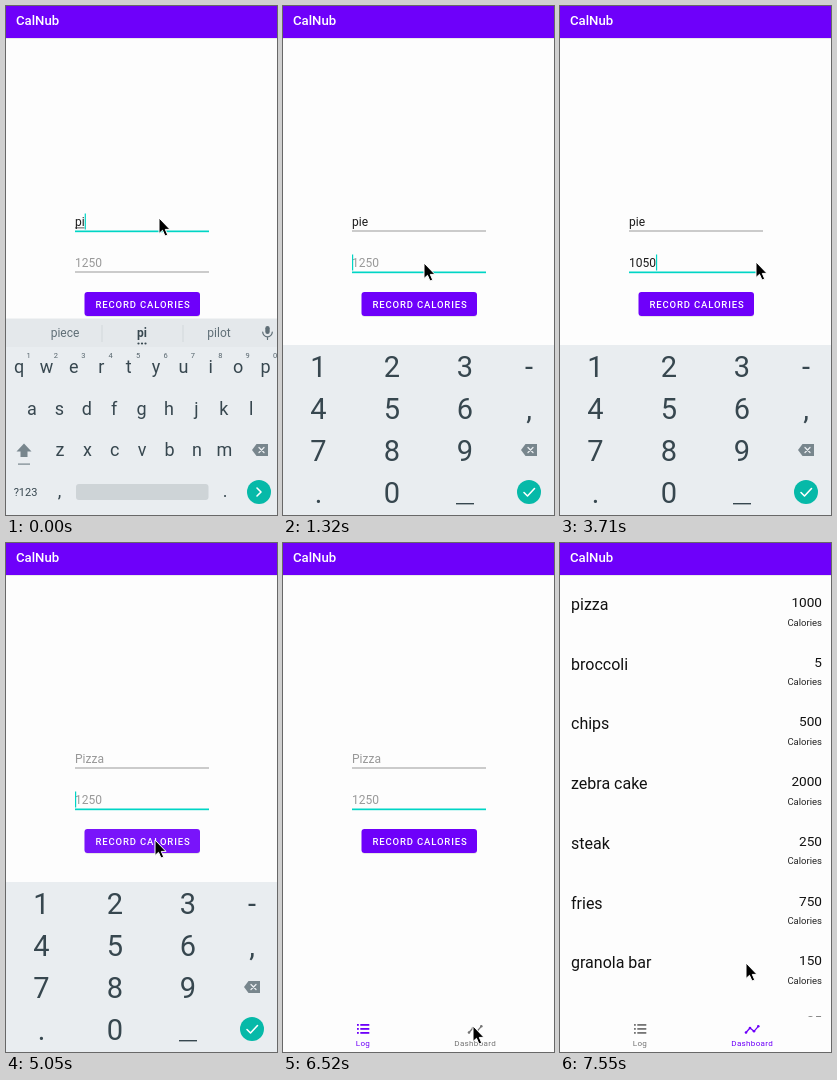
An HTML page that plays this animation: 271 px wide and 509 px high, repeating every 8000 ms.

```html
<!DOCTYPE html>
<html lang="en">
<head>
<meta charset="utf-8">
<title>Calorie log</title>
<style>
html, body { margin: 0; width: 100%; height: 100%; overflow: hidden; background: #fdfdfd; }
svg { display: block; width: 100vw; height: 100vh; font-family: Roboto, sans-serif; }
.mid { text-anchor: middle; }
.end { text-anchor: end; }
.key { fill: #37474f; font-size: 18px; }
.num { fill: #37474f; font-size: 29px; }
.line { fill: none; stroke-linecap: round; stroke-linejoin: round; }
</style>
</head>
<body>
<svg id="stage" viewBox="0 0 271 509"></svg>
<script>
const LOOP = 8000, STEPS = 54;
const PURPLE = '#6e00fa', TEAL = '#00d5c5', PANEL = '#e9edf0', INK = '#37474f', PAPER = '#fdfdfd';
const stage = document.getElementById('stage');

function add(parent, tag, attrs, text) {
  const el = document.createElementNS('http://www.w3.org/2000/svg', tag);
  for (const k in attrs) el.setAttribute(k, attrs[k]);
  if (text !== undefined) el.textContent = text;
  parent.appendChild(el);
  return el;
}
const group = (parent = stage) => add(parent, 'g', {});
const rect = (p, x, y, width, height, fill, rx = 0) => add(p, 'rect', { x, y, width, height, fill, rx });
const label = (p, x, y, text, attrs = {}) => add(p, 'text', { x, y, ...attrs }, text);
const stroke = (p, d, color, width) =>
  add(p, 'path', { d, stroke: color, 'stroke-width': width, class: 'line' });
const show = (el, on) => el.setAttribute('display', on ? 'inline' : 'none');
const set = (el, attrs) => { for (const k in attrs) el.setAttribute(k, attrs[k]); };

function backspace(p, x, y) {
  add(p, 'path', { d: `M${x - 8} ${y}l4.5 -6h11.500v12h-11.500z`, fill: '#78868d' });
  stroke(p, `M${x - 1} ${y - 2.5}l5 5m0 -5l-5 5`, PANEL, 1.3);
}
function action(p, x, y, d) {
  add(p, 'circle', { cx: x, cy: y, r: 12, fill: '#06b9a8' });
  stroke(p, d, '#fff', 1.6);
}

// page with the form
rect(stage, 0, 0, 271, 509, PAPER);
const veil = rect(stage, 0, 286, 271, 223, '#fafafb');
const form = group();

function field(base, hint) {
  const text = label(form, 69, base, hint, { 'font-size': 12 });
  const line = rect(form, 69, base + 4.5, 134, 1, '#999');
  const caret = rect(form, 69, base - 12.5, 1.2, 16, TEAL);
  return (value, focus, blink, width) => {
    text.textContent = value || hint;
    text.setAttribute('fill', value ? '#1c1c1c' : '#999');
    set(line, { fill: focus ? TEAL : '#999', height: focus ? 1.7 : 1 });
    caret.setAttribute('x', 69 + width);
    show(caret, focus && blink);
  };
}
const food = field(220, 'Pizza');
const amount = field(261, '1250');
const compose = rect(form, 69, 221.500, 9.7, 0.8, '#333');

rect(form, 79, 287, 115, 24, '#00000018', 3);
rect(form, 78.5, 286, 115.5, 24, PURPLE, 3);
const press = rect(form, 78.5, 286, 115.5, 24, '#fff', 3);
label(form, 89.500, 302, 'RECORD CALORIES',
  { fill: '#fff', 'font-size': 9.5, 'font-weight': 500, 'letter-spacing': 0.85 });

// dashboard list
const list = group();
const meals = [['pizza', 1000], ['broccoli', 5], ['chips', 500], ['zebra cake', 2000],
  ['steak', 250], ['fries', 750], ['granola bar', 150], ['toast', 35]];
meals.forEach(([name, kcal], i) => {
  const y = i * 59.7;
  label(list, 11, y + 67, name, { 'font-size': 16, fill: '#111' });
  label(list, 262, y + 64, kcal, { 'font-size': 13.6, fill: '#111', class: 'end' });
  label(list, 262, y + 82.500, 'Calories', { 'font-size': 9.5, fill: '#222', class: 'end' });
});

// bottom navigation
const nav = group();
rect(nav, 0, 473.5, 271, 36, PAPER);
const navEdge = rect(nav, 0, 472, 271, 1, '#f1f1f2');
const ripple = add(nav, 'path', { d: 'M158 473.500H226A37 37 0 0 1 226 509H158A37 37 0 0 1 158 473.500Z', fill: PURPLE });
const tab = (x, name) => {
  const g = group(nav);
  label(g, x, 503, name, { class: 'mid', 'font-size': 8.1, 'letter-spacing': 0.3 });
  return g;
};
const logTab = tab(80, 'Log'), dashTab = tab(192.2, 'Dashboard');
for (const y of [481, 485, 489]) {
  add(logTab, 'rect', { x: 74, y, width: 1.8, height: 1.8 });
  add(logTab, 'rect', { x: 77.3, y, width: 9, height: 1.8 });
}
const bends = [[186, 489.5], [190, 485], [194, 488.3], [198.3, 483.3]];
add(dashTab, 'path', { d: 'M' + bends.join('L'), class: 'line', stroke: 'inherit', 'stroke-width': 1.3 });
for (const [cx, cy] of bends) add(dashTab, 'circle', { cx, cy, r: 1.3, stroke: 'none' });
function tint(g, color) {
  g.setAttribute('fill', color);
  const path = g.querySelector('path');
  if (path) path.setAttribute('stroke', color);
}

// letter keyboard
const letters = group();
rect(letters, 0, 312, 271, 1, '#f1f3f4');
rect(letters, 0, 313, 271, 196, PANEL);
rect(letters, 0, 313, 271, 28, '#e4e8eb');
for (const x of [95.5, 176.5]) rect(letters, x, 319, 1, 17, '#d2d8db');
const hints = [59, 136, 213].map((x, i) => label(letters, x, 331, '',
  { class: 'mid', 'font-size': 12, fill: i === 1 ? INK : '#5f6e76', 'font-weight': i === 1 ? 700 : 400 }));
for (const x of [132.5, 136, 139.5]) add(letters, 'circle', { cx: x, cy: 337.5, r: 1.1, fill: INK });
rect(letters, 259.3, 320, 4.400, 8, '#5f6e76', 2.2);
stroke(letters, 'M256.700 326a4.800 4.800 0 0 0 9.600 0M261.500 331v2.500', '#5f6e76', 1.2);
[['qwertyuiop', 13, 367], ['asdfghjkl', 26, 409], ['zxcvbnm', 54, 450]].forEach(([row, x0, y], r) => {
  [...row].forEach((c, i) => {
    const x = x0 + i * 27.4;
    label(letters, x, y, c, { class: 'key mid' });
    if (r === 0) label(letters, x + 9.500, 352, (i + 1) % 10, { class: 'mid', 'font-size': 7.5, fill: '#56656d' });
  });
});
add(letters, 'path', { d: 'M18 437.500l7.500 8h-4v5.500h-7v-5.500h-4z', fill: '#78868d' });
rect(letters, 12, 457.500, 12, 1.2, '#78868d');
backspace(letters, 254, 444);
label(letters, 19.5, 490, '?123', { class: 'mid', 'font-size': 11, fill: INK });
label(letters, 53.5, 491, ',', { class: 'key mid' });
rect(letters, 70, 478, 132.500, 16, '#ced4d7', 3);
label(letters, 219, 491, '.', { class: 'key mid' });
action(letters, 253, 486, 'M251 482l4 4l-4 4');

// number keyboard
const numbers = group();
const numPanel = rect(numbers, 0, 339, 271, 170, PANEL);
['123-', '456,', '789', '.0'].forEach((row, r) => [...row].forEach((c, i) =>
  label(numbers, [35.5, 109, 182, 246][i], 371 + r * 42, c, { class: 'num mid' })));
rect(numbers, 173, 497, 18, 1.4, INK);
backspace(numbers, 246, 444);
action(numbers, 246, 486, 'M241 486.500l3.500 3.500l7 -7.500');

// app bar
rect(stage, 0, 32, 271, 1, '#00000014');
rect(stage, 0, 0, 271, 32, PURPLE);
label(stage, 10, 18.500, 'CalNub', { fill: '#fff', 'font-size': 13.2, 'font-weight': 500 });

const pointer = add(stage, 'path', {
  d: 'M0 -1V14.500L3.500 11.300L6 17L8.700 15.900L6.300 10.400H11Z',
  fill: '#000', stroke: '#fff', 'stroke-width': 1, 'stroke-linejoin': 'round'
});

// pointer stops: step, x, y
const stops = [[0, 153, 213], [2, 153, 213], [8, 141, 258], [9, 141, 258], [12, 196, 257], [28, 196, 257],
  [30, 149, 298], [37, 149, 298], [44, 190, 484], [46, 190, 484], [51, 186, 421], [53, 186, 421]];
function pointerAt(k) {
  let i = 0;
  while (i < stops.length - 2 && k > stops[i + 1][0]) i++;
  const [k0, x0, y0] = stops[i], [k1, x1, y1] = stops[i + 1];
  const u = (k - k0) / (k1 - k0), e = u * u * (3 - 2 * u);
  return [x0 + (x1 - x0) * e, y0 + (y1 - y0) * e];
}
const within = (k, a, b) => k >= a && k < b;

function draw(t) {
  // the screen refreshes in even steps
  const k = Math.min(STEPS - 1, Math.floor((t + 14) * STEPS / LOOP));
  const onDash = k >= 46, typing = k < 9, done = k >= 33;

  const word = done ? '' : k < 1 ? 'pi' : 'pie';
  const wordWidth = k < 1 ? 9.7 : 16.2;
  food(word, typing, k < 4 || k >= 7, wordWidth);
  show(compose, typing);
  compose.setAttribute('width', wordWidth - 0.3);
  (k < 1 ? ['piece', 'pi', 'pilot'] : ['pies', 'pie', 'piece']).forEach((s, i) => hints[i].textContent = s);

  const count = done ? 0 : [17, 20, 22, 25].filter(s => k >= s).length;
  const off = within(k, 15, 17) || within(k, 28, 33) || within(k, 38, 41) || k >= 44;
  amount('1050'.slice(0, count), !typing, !off, count * 6.74);
  press.setAttribute('opacity', { 32: 0.12, 33: 0.18, 34: 0.08 }[k] || 0);

  const sliding = k === 35;
  show(letters, typing);
  show(numbers, within(k, 9, 36));
  set(numbers, { transform: `translate(0 ${sliding ? 66 : 0})`, opacity: sliding ? 0.31 : 1 });
  show(numPanel, !sliding);
  show(veil, sliding);
  show(navEdge, sliding);
  show(nav, k >= 35);
  show(form, !onDash);
  show(list, onDash);
  tint(logTab, onDash ? '#757575' : sliding ? '#8b35ee' : PURPLE);
  tint(dashTab, onDash ? PURPLE : '#757575');
  ripple.setAttribute('opacity', { 45: 0.1, 46: 0.08, 47: 0.03 }[k] || 0);

  pointer.setAttribute('transform', `translate(${pointerAt(k).map(v => v.toFixed(1)).join(' ')})`);
}

function tick() {
  draw(performance.now() % LOOP);
  requestAnimationFrame(tick);
}
tick();
</script>
</body>
</html>
```
